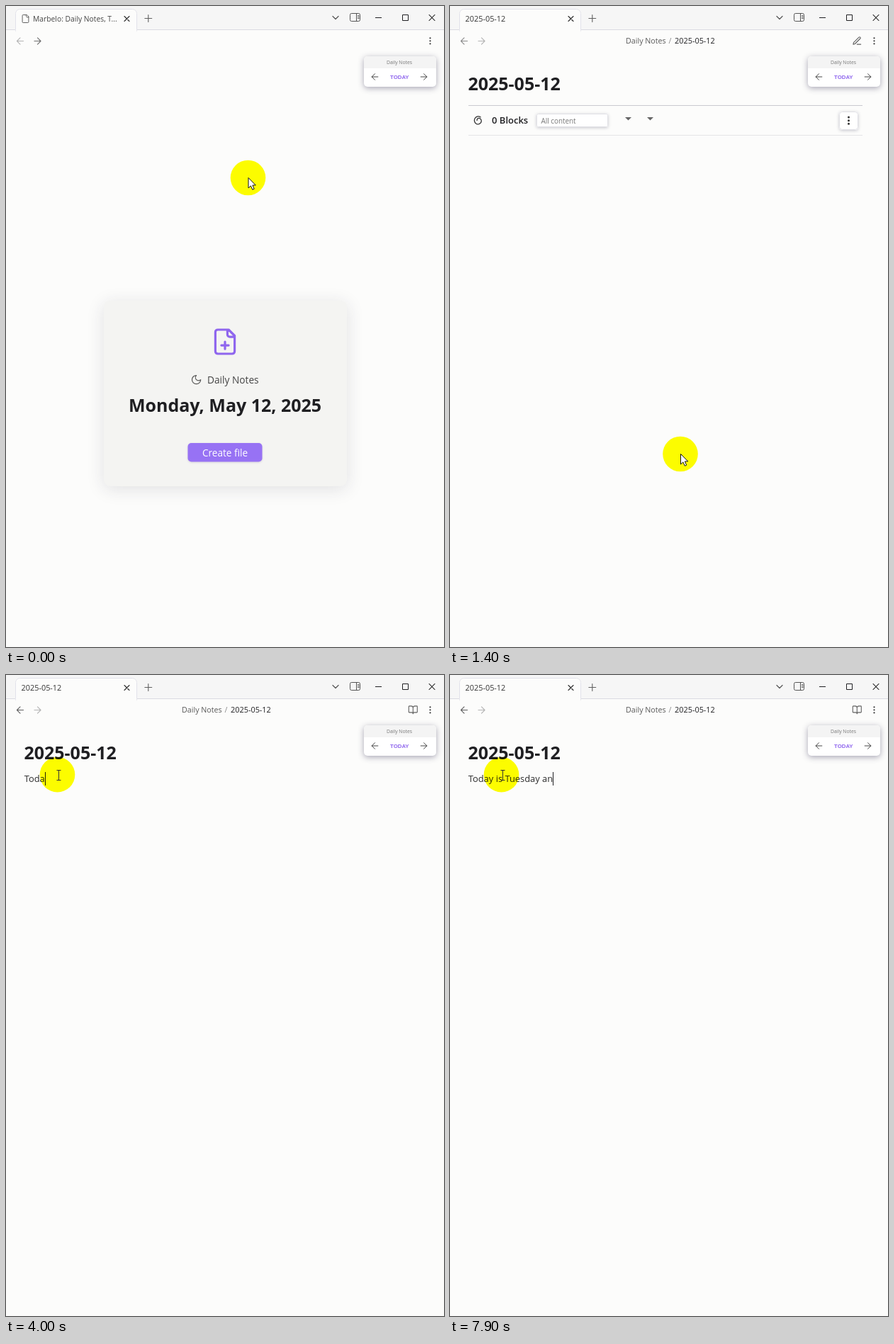
An HTML page with a canvas for the animation above (8 s loop, 618x905 px).

```html
<!DOCTYPE html>
<html lang="en">
<head>
<meta charset="utf-8">
<title>Daily note</title>
<style>
  html, body { margin: 0; width: 100%; height: 100%; overflow: hidden; background: #fcfcfb; }
  canvas { display: block; }
</style>
</head>
<body>
<canvas id="stage" width="618" height="905"></canvas>
<script>
const ctx = document.getElementById('stage').getContext('2d');
const LOOP = 8000, STEP = 100;
const OPENED = 1200, EDITING = 2100;
const SANS = '"Open Sans", "Noto Sans", sans-serif';
const ARIAL = '"Liberation Sans", Arial, sans-serif';
const PAGE = '#fcfcfb', INK = '#1f1f22', MID = '#606060', PALE = '#b4b4b4', PURPLE = '#8f66ee';
const SHADE = 'rgba(40,40,70,.25)';

const FILE = 'M15 2H6a2 2 0 0 0-2 2v16a2 2 0 0 0 2 2h12a2 2 0 0 0 2-2V7Z M14 2v4a2 2 0 0 0 2 2h4';
const PLUS = 'M9 15h6 M12 18v-6';
const MOON = 'M12 3a6 6 0 0 0 9 9 9 9 0 1 1-9-9Z';
const LEFT = 'm12 19-7-7 7-7 M19 12H5';
const RIGHT = 'm12 5 7 7-7 7 M5 12h14';
const CROSS = 'M6 6 18 18 M18 6 6 18';
const ADD = 'M4 12h16 M12 4v16';
const DOWN = 'm6 9 6 6 6-6';
const PENCIL = 'M12 20h9 M16.5 3.5a2.12 2.12 0 0 1 3 3L7 19l-4 1 1-4Z';
const BOOK = 'M12 7v14 M3 18a1 1 0 0 1-1-1V4a1 1 0 0 1 1-1h5a4 4 0 0 1 4 4 4 4 0 0 1 4-4h5a1 1 0 0 1 1 1v13a1 1 0 0 1-1 1h-6a3 3 0 0 0-3 3 3 3 0 0 0-3-3z';
const ARROW = new Path2D('M0 0V14.5L3.4 11.4 5.8 16.8 8.2 15.7 5.9 10.5H10.3Z');

// Pointer stops, and the eased curved moves that join them
const REST = [341.5, 242.5], BUTTON = [325, 632.5], TITLE = [71, 141], NOTE = [72.5, 140.7];
const MOVES = [
  { start: 200, end: 1100, from: REST, bend: [346, 437], to: BUTTON },
  { start: 1600, end: 2800, from: BUTTON, bend: [345, 70], to: TITLE },
  { start: 2900, end: 3100, from: TITLE, bend: [75, 161], to: NOTE }
];

// Bursts of typing at an even pace; '<' deletes
const BURSTS = [
  { start: 3400, gap: 160, keys: 'Today ' },
  { start: 4400, gap: 150, keys: 'is ' },
  { start: 4900, gap: 200, keys: 'TU' },
  { start: 5600, gap: 400, keys: '<ue' },
  { start: 7200, gap: 110, keys: 'sday an' }
];

function text(str, x, y, size, color = INK, weight = 400, align = 'left', family = SANS) {
  ctx.font = `${weight} ${size}px ${family}`;
  ctx.textAlign = align;
  ctx.fillStyle = color;
  ctx.fillText(str, x, y);
}

function icon(d, cx, cy, scale, color = MID, width = 1.1) {
  ctx.save();
  ctx.translate(cx, cy);
  ctx.scale(scale, scale);
  ctx.translate(-12, -12);
  ctx.lineCap = ctx.lineJoin = 'round';
  ctx.lineWidth = width / scale;
  ctx.strokeStyle = color;
  ctx.stroke(new Path2D(d));
  ctx.restore();
}

function line(color, x0, y0, x1, y1) {
  ctx.strokeStyle = color;
  ctx.lineWidth = 1;
  ctx.beginPath();
  ctx.moveTo(x0, y0);
  ctx.lineTo(x1, y1);
  ctx.stroke();
}

function box(x, y, w, h, r, fill, shadow = 'transparent', blur = 0, drop = 0) {
  ctx.save();
  ctx.shadowColor = shadow;
  ctx.shadowBlur = blur;
  ctx.shadowOffsetY = drop;
  ctx.fillStyle = fill;
  ctx.beginPath();
  ctx.roundRect(x, y, w, h, r);
  ctx.fill();
  ctx.restore();
}

function outline(x, y, w, h, r, color) {
  ctx.strokeStyle = color;
  ctx.lineWidth = 1;
  ctx.beginPath();
  ctx.roundRect(x + .5, y + .5, w - 1, h - 1, r);
  ctx.stroke();
}

function field(x, y, w, h, r) {
  box(x, y, w, h, r, '#fff', SHADE, 4, 1);
  outline(x, y, w, h, r, '#e1e1e6');
}

function disc(x, y, r, color) {
  ctx.fillStyle = color;
  ctx.beginPath();
  ctx.arc(x, y, r, 0, 7);
  ctx.fill();
}

function kebab(x, y, gap, r) {
  for (const k of [-1, 0, 1]) disc(x, y + k * gap, r, '#333');
}

function titleBar(open) {
  box(0, 0, 618, 33, 0, '#f6f6f6');
  line('#dadae2', 0, 33.5, 618, 33.5);
  box(13, 4, 172, 30, [6, 6, 0, 0], PAGE);
  outline(13, 4, 172, 36, 6, '#e2e2ea');
  box(14, 33, 170, 8, 0, PAGE);
  if (open) {
    text('2025-05-12', 21.5, 22, 10.9, '#333');
  } else {
    icon(FILE, 27.5, 18, .55, MID, 1);
    text('Marbelo: Daily Notes, T...', 38, 22, 10.3, '#444');
  }
  icon(CROSS, 170.5, 18, .58, '#333', 1.2);
  icon(ADD, 200.8, 17.5, .62);

  icon(DOWN, 465, 16.5, .67, '#555', 1.2);
  outline(485, 10, 15, 12, 2, '#555');
  line('#555', 494.5, 10.5, 494.5, 21.5);
  for (const y of [13.5, 15.5, 17.5]) line('#555', 496, y, 498.5, y);
  line(INK, 521, 16.5, 530, 16.5);
  outline(559, 12, 9, 9, 0, INK);
  icon(CROSS, 601, 16.5, .67, '#333');
}

function navBar(open, editing) {
  icon(LEFT, 20, 49.5, .65, editing ? MID : open ? '#8c8c8c' : PALE);
  icon(RIGHT, 44.5, 49.5, .65, open ? PALE : '#707070');
  kebab(598.5, 49.3, 4, 1.1);
  if (!open) return;
  text('Daily Notes', 248, 53, 10.7, '#5a5a5a');
  text('/', 308.5, 53, 10.7, '#888');
  text('2025-05-12', 317, 53, 10.9);
  icon(editing ? BOOK : PENCIL, 574.3, 49.3, .6);
}

function dayPicker() {
  box(505, 71, 102, 43, 5, '#fff', 'rgba(50,45,80,.42)', 9, 2);
  box(505, 71, 102, 17, [5, 5, 0, 0], '#f4f4f4');
  text('Daily Notes', 555, 82, 6.8, '#777', 400, 'center');
  text('TODAY', 555.3, 102.5, 7.8, PURPLE, 700, 'center', ARIAL);
  icon(LEFT, 520.5, 100, .62, '#333', .9);
  icon(RIGHT, 589.5, 100, .62, '#333', .9);
}

function emptyCard(hover) {
  box(138, 416, 343, 262, 9, '#f4f4f2', 'rgba(40,40,60,.13)', 24, 4);
  icon(FILE + PLUS, 309, 474, 1.7, PURPLE, 3.2);
  icon(MOON, 268.6, 527.6, .68, '#555', 1.2);
  text('Daily Notes', 284, 532.5, 13.7, '#444', 500);
  text('Monday, May 12, 2025', 309, 573, 25, INK, 700, 'center');
  const lift = hover ? 1 : 0;
  box(256.5, 617 - lift, 105, 26.5, 5, '#9772f4',
    `rgba(40,30,80,${hover ? .35 : .15})`, 3 + 6 * lift, 1 + 2 * lift);
  text('Create file', 309, 635.7 - lift, 13.6, '#fff', 400, 'center');
}

function swirl(x, y) {
  ctx.strokeStyle = '#333';
  ctx.lineWidth = 1.3;
  ctx.beginPath();
  for (let a = 0; a < 9; a += .2) {
    const r = Math.min(5.6, 1.6 + a * .75);
    ctx.lineTo(x + r * Math.cos(a - 3.4), y + r * Math.sin(a - 3.4));
  }
  ctx.stroke();
}

function blockBar() {
  line('#c9c9cf', 26, 140.5, 582, 140.5);
  line('#e4e4e7', 26, 182.5, 582, 182.5);
  swirl(40, 161.5);
  text('0 Blocks', 59, 166, 13, INK, 600);
  field(122, 152, 101, 19, 2);
  text('All content', 128.5, 165.5, 9.9, '#777');
  ctx.fillStyle = '#666';
  for (const x of [251.5, 282.5]) {
    ctx.beginPath();
    ctx.moveTo(x - 4.5, 157);
    ctx.lineTo(x + 4.5, 157);
    ctx.lineTo(x, 161.5);
    ctx.fill();
  }
  field(549, 149, 27, 26, 4);
  kebab(562.5, 161.7, 4.6, 1.5);
}

function editor(t) {
  let typed = '', last = EDITING;
  for (const { start, gap, keys } of BURSTS) {
    [...keys].forEach((key, i) => {
      const time = start + i * gap;
      if (time > t) return;
      typed = key === '<' ? typed.slice(0, -1) : typed + key;
      last = time;
    });
  }
  text(typed, 25.7, 151, 12.9, '#2e2e2e');
  if ((t - last) % 1200 < 600) {
    box(Math.round(25.5 + ctx.measureText(typed).width), 137, 1, 19, 0, INK);
  }
}

function pointerAt(t) {
  const move = MOVES.findLast(m => t >= m.start) || MOVES[0];
  const k = Math.min(1, Math.max(0, (t - move.start) / (move.end - move.start)));
  const s = k * k * (3 - 2 * k), r = 1 - s;
  return [0, 1].map(i => r * r * move.from[i] + 2 * r * s * move.bend[i] + s * s * move.to[i]);
}

function pointer(x, y, beam) {
  ctx.save();
  ctx.globalCompositeOperation = 'multiply';
  disc(x, y, 24.8, '#ffff00');
  ctx.restore();

  ctx.save();
  if (beam) {
    ctx.translate(Math.round(x + 1) + .5, Math.round(y));
    line('#333', 0, -6, 0, 8);
    line('#333', -3, -6.5, 3, -6.5);
    line('#333', -3, 7.5, 3, 7.5);
  } else {
    ctx.translate(x + .5, y);
    ctx.fillStyle = '#fff';
    ctx.fill(ARROW);
    ctx.strokeStyle = '#111';
    ctx.lineWidth = 1;
    ctx.stroke(ARROW);
  }
  ctx.restore();
}

function draw(t) {
  const open = t >= OPENED, editing = t >= EDITING;
  const [x, y] = pointerAt(t);
  box(0, 0, 618, 905, 0, PAGE);
  titleBar(open);
  navBar(open, editing);
  if (open) {
    text('2025-05-12', 25.5, 118.5, 25, INK, 700);
    if (editing) editor(t);
    else blockBar();
  } else {
    emptyCard(y > 605);
  }
  dayPicker();
  pointer(x, y, editing);
}

const start = performance.now();
function tick() {
  const t = (performance.now() - start) % LOOP;
  draw(Math.floor(t / STEP) * STEP);
  requestAnimationFrame(tick);
}
tick();
</script>
</body>
</html>
```
